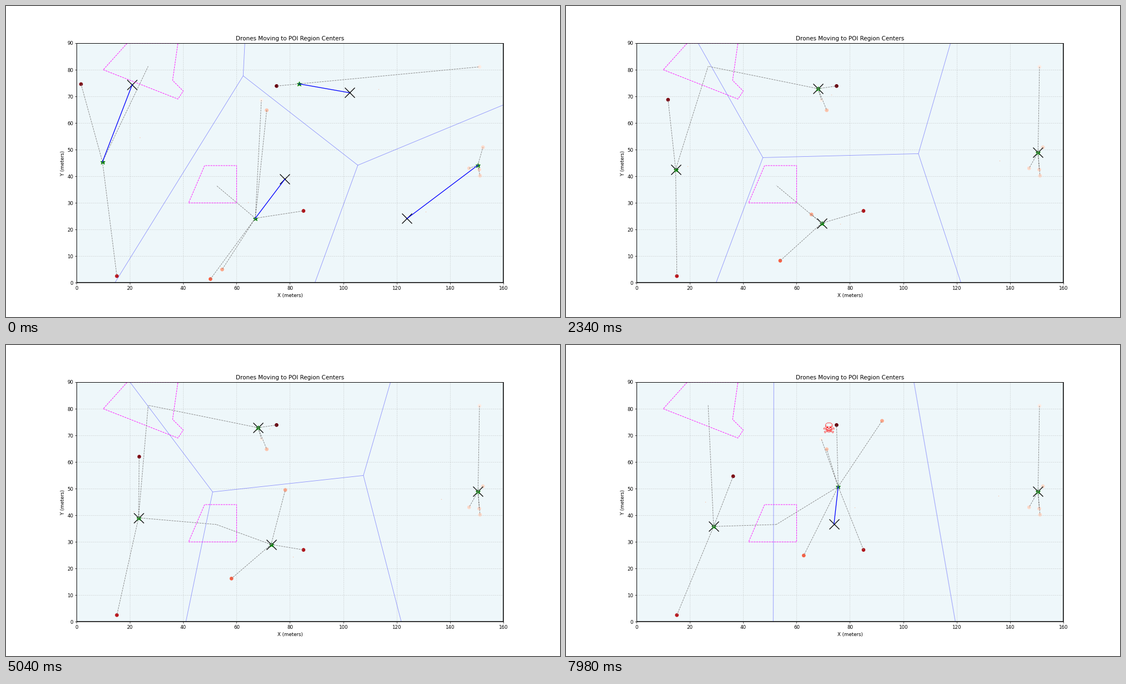
A matplotlib script that plays this animation: 998x561 px, repeating every 8000 ms.

```python
import numpy as np
import matplotlib.pyplot as plt
from matplotlib.animation import FuncAnimation
from matplotlib.collections import LineCollection

W, H = 160, 90
STEP_MS, TICK_MS, LOOP_MS = 60, 40, 8000
STEPS = LOOP_MS // STEP_MS + 1
LOSS_STEP, LOST = 124, 2
DPI = 64
S = 62.375 / DPI  # scale of all point sizes


def poi(x, y, weight, speed=0, heading=0):
    a = np.radians(heading)
    return x, y, speed * np.cos(a), speed * np.sin(a), weight


POIS = np.array([
    poi(1.66, 74.6, 4.6, speed=0.3, heading=-30),
    poi(50.2, 1.4, 2.7, speed=0.2, heading=62),
    poi(54.6, 5.0, 1.75, speed=0.6, heading=62),
    poi(15.1, 2.5, 3.9),
    poi(85.1, 27.0, 4.1),
    poi(75.0, 73.9, 4.8),
    poi(71.3, 64.8, 1.35),
    poi(69.3, 68.6, 0.4),
    poi(151.1, 81.1, 0.6),
] + [poi(x, y, 1) for x, y in
     [(152.4, 50.9), (147.2, 43), (151, 42.5), (151.3, 40.2)]])
WEIGHTS = POIS[:, 4]

DRONES = np.array([(21.2, 75.3), (78.7, 39.7), (103.3, 71.2), (123.1, 23.5)])
BOX = np.array([(0, 0), (W, 0), (W, H), (0, H)], float)
AREAS = [
    np.array([(10, 80), (38, 69), (40, 72), (36, 76), (38, H), (19, H)], float),
    np.array([(42, 30), (60, 30), (60, 44), (48, 44)], float),
]
AREA_WEIGHT = 0.93


def centroid(poly):
    nxt = np.roll(poly, -1, axis=0)
    cross = poly[:, 0] * nxt[:, 1] - nxt[:, 0] * poly[:, 1]
    return ((poly + nxt) * cross[:, None]).sum(0) / (3 * cross.sum())


def halfplanes(i, sites, skip=()):
    """Pairs (n, c) with n.x <= c for points closer to site i."""
    p = sites[i]
    return [(q - p, (q @ q - p @ p) / 2)
            for k, q in enumerate(sites) if k != i and k not in skip]


def clip(poly, planes):
    for n, c in planes:
        out = []
        for a, b in zip(poly, np.roll(poly, -1, axis=0)):
            da, db = n @ a - c, n @ b - c
            if da <= 0:
                out.append(a)
            if da * db < 0:
                out.append(a + (b - a) * da / (da - db))
        if len(out) < 3:
            return None
        poly = np.array(out)
    return poly


def voronoi_edges(sites):
    edges = []
    for i in range(len(sites)):
        for j in range(i):
            mid = (sites[i] + sites[j]) / 2
            d = sites[i] - sites[j]
            d = np.array([-d[1], d[0]]) / np.hypot(*d)
            lo, hi = -400.0, 400.0
            for n, c in halfplanes(i, sites, skip=(j,)):
                rate, room = n @ d, c - n @ mid
                if rate > 0:
                    hi = min(hi, room / rate)
                elif rate < 0:
                    lo = max(lo, room / rate)
            if lo < hi:
                edges.append([mid + lo * d, mid + hi * d])
    return edges


AREA_CENTERS = [centroid(a) for a in AREAS]


def survey(sites, points):
    """Target, linked points and cell centre for every drone."""
    dist = np.linalg.norm(points[:, None] - sites[None], axis=2)
    owner = dist.argmin(axis=1)
    targets, links, centers = [], [], []
    for i in range(len(sites)):
        planes = halfplanes(i, sites)
        pts = list(points[owner == i])
        wts = list(WEIGHTS[owner == i])
        for area, mid in zip(AREAS, AREA_CENTERS):
            if clip(area, planes) is not None:
                pts.append(mid)
                wts.append(AREA_WEIGHT)
        target = np.average(pts, axis=0, weights=wts) if pts else sites[i]
        targets.append(target)
        links += [(target, p) for p in pts]
        cell = clip(BOX, planes)
        centers.append(sites[i] if cell is None else centroid(cell))
    return np.array(targets), links, np.array(centers)


def simulate():
    states, drones, wreck = [], DRONES, None
    for step in range(STEPS):
        if step == LOSS_STEP:
            wreck = drones[LOST]
            drones = np.delete(drones, LOST, axis=0)
        points = POIS[:, :2] + step * POIS[:, 2:4]
        targets, links, centers = survey(drones, points)
        edges = voronoi_edges(drones)
        gap = targets - drones
        dist = np.linalg.norm(gap, axis=1, keepdims=True)
        drones = drones + gap / np.maximum(dist, 1)  # at most one metre
        states.append((points, drones, targets, links, centers, edges, wreck))
    return states


def joined(pairs):
    """Separate segments as one broken line."""
    rows = [row for a, b in pairs for row in (a, b, (np.nan, np.nan))]
    return np.array(rows).T


def outline(poly, **style):
    ax.plot(*np.vstack([poly, poly[:1]]).T, **style)


STATES = simulate()

plt.rcParams['font.family'] = 'DejaVu Sans'
for key in ('font.size', 'axes.titlepad', 'axes.labelpad', 'axes.linewidth',
            'grid.linewidth', 'xtick.major.size', 'ytick.major.size',
            'xtick.major.pad', 'ytick.major.pad',
            'xtick.major.width', 'ytick.major.width'):
    plt.rcParams[key] *= S

fig = plt.figure(figsize=(998 / DPI, 561 / DPI), dpi=DPI, facecolor='white')
ax = fig.add_axes([127.2 / 998, 61.75 / 561, 768.5 / 998, 432.26 / 561])
ax.set(xlim=(0, W), ylim=(0, H), facecolor='#eef7fa',
       xticks=range(0, W + 1, 20), yticks=range(0, H + 1, 10),
       xlabel='X (meters)', ylabel='Y (meters)',
       title='Drones Moving to POI Region Centers')
ax.grid(True, linestyle='--', alpha=0.5)

outline(BOX, color='black', lw=2 * S)
for area in AREAS:
    outline(area, color='magenta', ls='--', lw=S)

borders = LineCollection([], colors='blue', zorder=1.8)
ax.add_collection(borders, autolim=False)
cells, = ax.plot([], [], 'o', color='#f9bfa5', ms=1.5, mew=0, zorder=1.1)
pois = ax.scatter(POIS[:, 0], POIS[:, 1], c=WEIGHTS, cmap='Reds',
                  vmin=0.35, vmax=4.8, s=42, lw=S, zorder=1.2)
crosses, = ax.plot([], [], 'x', color='black', ms=20 * S, mew=1.5 * S, zorder=1.3)
stars, = ax.plot([], [], '*', color='green', ms=10 * S, mew=S, zorder=1.4)
spokes, = ax.plot([], [], '--', color='gray', lw=S, zorder=2.1)
routes, = ax.plot([], [], '-', color='blue', lw=1.5 * S, zorder=2.2)
skull = ax.text(0, 0, '\u2620', color='red', fontsize=30 * S, weight='bold',
                ha='center', va='center', zorder=6, visible=False)


def draw(frame):
    step = min((frame * TICK_MS + 20) // STEP_MS, STEPS - 1)
    points, drones, targets, links, centers, edges, wreck = STATES[step]
    pois.set_offsets(points)
    crosses.set_data(*drones.T)
    stars.set_data(*targets.T)
    cells.set_data(*centers.T)
    spokes.set_data(*joined(links))
    routes.set_data(*joined(zip(drones, targets)))
    borders.set_segments(edges)
    lost = wreck is not None
    borders.set_linewidth(1.5 * S if lost else S)
    borders.set_alpha(0.28 if lost else 0.4)
    skull.set_visible(lost)
    if lost:
        skull.set_position(wreck)
    return ()


anim = FuncAnimation(fig, draw, frames=LOOP_MS // TICK_MS, interval=TICK_MS,
                     init_func=lambda: draw(0), repeat=True, repeat_delay=0)
plt.show()
```
